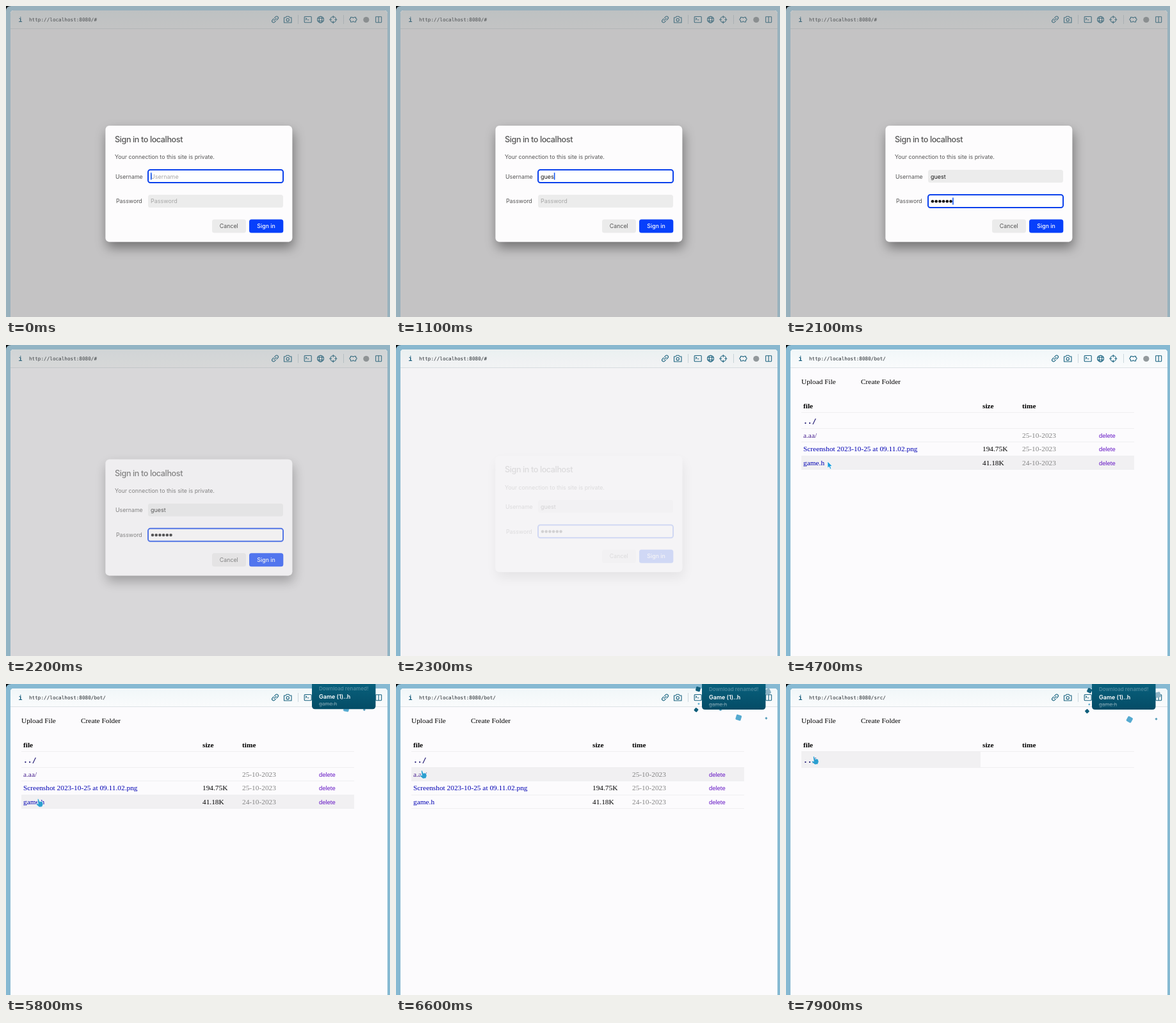
These frames come from a looping animation (600x486 px, 8000 ms). An HTML page:

```html
<!DOCTYPE html>
<html lang="en">
<head>
<meta charset="utf-8">
<title>File browser</title>
<style>
  html, body { margin: 0; width: 100%; height: 100%; overflow: hidden; background: #000; }
  svg { display: block; width: 600px; height: 486px; }
  text { white-space: pre; }
  .serif { font: 11.35px "Liberation Serif", serif; }
  .bold { font-weight: bold; }
  .mono { font: 7.66px "DejaVu Sans Mono", monospace; }
  .up { font: bold 11.35px "DejaVu Sans Mono", monospace; fill: #1c1470; }
  .del { font: 9.46px "Liberation Sans", sans-serif; fill: #6414c4; }
  .ui { font: 8.8px Inter, sans-serif; fill: #555; }
  .link { fill: #0000b4; }
  .seen { fill: #482090; }
  .gray { fill: #858585; }
  .icon { fill: none; stroke: #17627f; stroke-width: 1.1; stroke-linejoin: round; stroke-linecap: round; }
</style>
</head>
<body>
<svg id="stage" viewBox="0 0 600 486">
  <defs>
    <linearGradient id="barFill" x2="0" y2="1"><stop stop-color="#f1f7f9"/><stop offset="1" stop-color="#fafbfc"/></linearGradient>
    <linearGradient id="toastFill" x2="0" y2="1"><stop stop-color="#0b6a87"/><stop offset="1" stop-color="#044c66"/></linearGradient>
    <filter id="shadow" x="-20%" y="-20%" width="140%" height="150%"><feDropShadow dy="9" stdDeviation="9" flood-opacity=".42"/></filter>
  </defs>
  <rect width="600" height="486" fill="#05090b"/>
  <path id="frame" d="M0 486V8Q0 0 8 0H600V486Z"/>
  <path d="M7 486V12Q7 7 12 7H591Q596 7 596 12V486Z" fill="#fcfbfd"/>
  <path d="M7 36V12Q7 7 12 7H591Q596 7 596 12V36Z" fill="url(#barFill)"/>
  <path d="M7 35.5H596" stroke="#dce2e5"/>
  <text x="22.5" y="25" text-anchor="middle" style="font:bold 10px 'Liberation Mono',monospace" fill="#0d5878">i</text>
  <text id="url" class="mono" x="36" y="24" fill="#1c2226"></text>
  <path d="M456.5 14V28M527.5 14V28" stroke="#ccd8dd"/>
  <g class="icon">
    <g transform="translate(420.5 21) rotate(-45)">
      <path d="M-1 -2.4H-3.5a2.4 2.4 0 0 0 0 4.8H-1M1 -2.4H3.5a2.4 2.4 0 0 1 0 4.8H1M-2.4 0H2.4"/>
    </g>
    <path d="M434.5 18H437L438.3 16.3H442L443.3 18H446V26H434.5Z"/><circle cx="440.2" cy="21.7" r="2.2"/>
    <rect x="466.2" y="16.5" width="11" height="9.3" rx="1"/><path d="M468.3 18.8L470 20.2L468.3 21.6M471.2 21.8H473"/>
    <circle cx="491.5" cy="21.2" r="5"/><ellipse cx="491.5" cy="21.2" rx="2.2" ry="5"/><path d="M487 19.3H496M487 23.2H496"/>
    <circle cx="511.3" cy="21.2" r="4.4"/><path d="M511.3 15.5V18.7M511.3 23.7V26.9M505.6 21.2H508.8M513.8 21.2H517"/>
    <path d="M538.5 17.5H541a1.6 1.6 0 0 0 3 0H546.5V19.5a1.6 1.6 0 0 1 0 3.2V25H544a1.6 1.6 0 0 0 -3 0H538.5V22.7a1.6 1.6 0 0 1 0 -3.2Z"/>
    <rect x="577.7" y="16.7" width="9" height="9" rx=".6"/><path d="M582.2 17V25.5"/>
  </g>
  <circle cx="562.8" cy="21.5" r="4.6" fill="#92999c"/>
  <g id="page"></g>
  <path id="dim" d="M7 486V12Q7 7 12 7H591Q596 7 596 12V486Z" fill="#828282"/>
  <g id="dialog">
    <rect x="155.5" y="187" width="291.7" height="181.5" rx="6" fill="#fdfcfd" filter="url(#shadow)"/>
    <text x="170" y="213" class="ui" style="font-size:12.6px;font-weight:500;letter-spacing:-.4px">Sign in to localhost</text>
    <text x="170" y="239.3" class="ui">Your connection to this site is private.</text>
    <text x="171" y="269.5" class="ui">Username</text>
    <text x="172" y="308.3" class="ui">Password</text>
    <rect id="userBox" x="222" y="256" width="211" height="20" rx="3.5" stroke-width="2"/>
    <rect id="passBox" x="222" y="295" width="211" height="20" rx="3.5" stroke-width="2"/>
    <text id="user" x="226" y="269.5" class="ui" style="font-size:9px"></text>
    <text id="passHint" x="226" y="308.3" class="ui" style="font-size:9px;fill:#a6a6a6">Password</text>
    <g id="dots"></g>
    <rect id="caret" width="1.5" height="11" fill="#0a50f0"/>
    <rect x="322" y="333.5" width="53" height="21" rx="3.5" fill="#ebebeb"/>
    <text x="348.3" y="347.2" text-anchor="middle" class="ui">Cancel</text>
    <rect x="380" y="333.5" width="53.3" height="21" rx="3.5" fill="#0740fb"/>
    <text x="406.6" y="347.2" text-anchor="middle" class="ui" style="fill:#fff;font-weight:500">Sign in</text>
  </g>
  <g id="confetti"></g>
  <g id="toast">
    <path d="M478 -20H577.5V35Q577.5 40 572.5 40H483Q478 40 478 35Z" fill="url(#toastFill)"/>
    <g style="font-family:Inter,sans-serif" fill="#fff">
      <text x="489" y="11" font-size="8" font-weight="600" opacity=".27">Download renamed!</text>
      <text x="489" y="23.5" font-size="9" font-weight="600">Game (1)..h</text>
      <text x="489" y="34.5" font-size="8" opacity=".42" text-decoration="line-through">game.h</text>
    </g>
  </g>
  <g id="cursor" stroke="#fff" stroke-width=".7" stroke-linejoin="round">
    <path id="arrow" fill="#189ddb" d="M0 0V10.2L2.3 8.2L4 12L5.8 11.2L4.2 7.5L7.2 7.3Z"/>
    <path id="hand" fill="#2c9fd0" d="M-.8 .4Q.4 -.6 1.3 .6L2.8 4.4L5 3.8L7.3 4.8L8.2 8.5L6.6 12.5L2.2 13L-2.8 8.8Q-3 7.2 -1.5 7.2L.4 8Z"/>
  </g>
</svg>
<script>
const LOOP = 8000;
const $ = id => document.getElementById(id);
const clamp = v => Math.max(0, Math.min(1, v));
const progress = (t, from, to) => clamp((t - from) / (to - from));
const easeOut = p => 1 - (1 - p) ** 3;
const smooth = p => p * p * (3 - 2 * p);
const mix = (a, b, p) => a + (b - a) * p;

const ROW_TOP = 131, ROW_STEP = 21.25;
// Row: name, size, date, visited, deletable
const pages = {
  root: { path: '#', up: './', rows: [
    ['bot/', '', '27-10-2023', true, false],
    ['src/', '', '25-10-2023', true, true],
    ['include/', '', '25-10-2023', false, true],
    ['Game.h', '41.18K', '27-10-2023', false, true],
    ['Screenshot 2023-10-25 at 13.20.14.png', '188.24K', '25-10-2023', false, true]] },
  bot: { path: 'bot/', up: '../', rows: [
    ['a.aa/', '', '25-10-2023', true, true],
    ['Screenshot 2023-10-25 at 09.11.02.png', '194.75K', '25-10-2023', false, true],
    ['game.h', '41.18K', '24-10-2023', false, true]] },
  src: { path: 'src/', up: '../', rows: [] },
};
const visits = [[2500, 'root'], [3900, 'bot'], [6900, 'root'], [7500, 'src']];

// Cursor stops: time, x, y
const stops = [[2700, 330, 300], [3100, 239, 170], [3650, 40, 137], [4100, 40, 137],
  [4700, 65, 182], [5000, 50, 180], [5750, 50, 180], [6500, 40, 135], [6650, 40, 135],
  [6850, 39, 115], [7000, 39, 115], [7350, 38, 157], [7550, 38, 157], [7850, 43, 113]];

// Confetti: x, y, size, colour, drift x, drift y
const bits = [
  [472, 8, 7, '#12617f', 2.3, 2.3], [469, 40.5, 5.5, '#0f5e7b', 1.5, 2],
  [473, 31, 2.6, '#65b0d0', .8, .9], [507, 40, 3.5, '#4f9dbd', 0, -3],
  [535.3, 52.5, 8.5, '#55aad0', 1.5, 3], [578.5, 53.5, 3, '#5a9ebb', 0, 1.2],
  [581, 12, 8.5, '#8db3c5', 0, 5]];

const label = (x, y, cls, str) => `<text x="${x}" y="${y}" class="${cls}">${str}</text>`;
const line = y => `<path d="M24 ${y}H544" stroke="#efeff1"/>`;

function pageMarkup({ up, rows }) {
  const head = label(24, 61, 'serif', 'Upload File') + label(117, 61, 'serif', 'Create Folder') +
    [[27, 'file'], [307, 'size'], [369, 'time']].map(([x, s]) => label(x, 99, 'serif bold', s)).join('');
  const list = rows.map(([name, size, date, visited, deletable], i) => {
    const y = 145.2 + ROW_STEP * i;
    return label(27, y, 'serif ' + (visited ? 'seen' : 'link'), name) + label(307, y, 'serif', size) +
      label(369, y, 'serif gray', date) + (deletable ? label(489, y, 'del', 'delete') : '') +
      line(Math.round(ROW_TOP + ROW_STEP * (i + 1)) - .5);
  }).join('');
  return '<rect id="hover" x="24" fill="#f1f0f2"/>' + head + line(105.5) + line(130.5) +
    label(27, 123, 'up', up) + list;
}

$('dots').innerHTML = Array.from({ length: 6 }, (_, i) =>
  `<circle cx="${229 + 5.7 * i}" cy="305.2" r="2.3" fill="#111"/>`).join('');
$('confetti').innerHTML = bits.map(([, , s, color]) =>
  `<rect x="${-s / 2}" y="${-s / 2}" width="${s}" height="${s}" rx="${s / 5}" fill="${color}"/>`).join('');

const show = (id, on) => $(id).setAttribute('visibility', on ? 'visible' : 'hidden');
const set = (id, attrs) => { for (const k in attrs) $(id).setAttribute(k, attrs[k]); };

function drawDialog(t) {
  const gone = progress(t, 2130, 2330), opacity = 1 - gone;
  const onPass = t >= 1450;
  const typed = 'guest'.slice(0, Math.floor(5 * progress(t, 450, 1250)));
  const dots = Math.floor(6 * progress(t, 1500, 2050));
  const focus = { fill: '#fff', stroke: '#0a40ec' }, idle = { fill: '#ececec', stroke: 'none' };
  set('dim', { opacity: .46 * opacity });
  set('frame', { fill: `rgb(${mix(134, 152, opacity)},${mix(185, 177, opacity)},${mix(210, 189, opacity)})` });
  set('dialog', { opacity, transform: `translate(0 ${-14 * (1 - opacity ** 2)})` });
  set('userBox', onPass ? idle : focus);
  set('passBox', onPass ? focus : idle);
  $('user').textContent = typed || 'Username';
  $('user').style.fill = typed ? '#1a1a1a' : '#a6a6a6';
  show('passHint', !dots);
  [...$('dots').children].forEach((dot, i) => dot.setAttribute('visibility', i < dots ? 'visible' : 'hidden'));
  const textEnd = typed ? 226 + $('user').getComputedTextLength() : 226;
  set('caret', { x: onPass ? 226 + 5.7 * dots : textEnd, y: onPass ? 299.5 : 260.5 });
  show('caret', t < 2130);
}

function cursorAt(t) {
  const next = stops.findIndex(s => s[0] > t);
  if (next < 0) return stops[stops.length - 1].slice(1);
  const [t0, x0, y0] = stops[Math.max(0, next - 1)], [t1, x1, y1] = stops[next];
  const p = smooth(progress(t, t0, t1));
  return [mix(x0, x1, p), mix(y0, y1, p)];
}

let current;
function drawPage(t) {
  const visit = visits.filter(v => v[0] <= t).pop();
  const name = visit && visit[1], page = pages[name || 'root'];
  if (name !== current) {
    $('page').innerHTML = name ? pageMarkup(page) : '';
    current = name;
  }
  $('url').textContent = 'http://localhost:8080/' + page.path;
  const visible = t >= stops[0][0];
  show('cursor', visible);
  show('arrow', false);
  show('hand', false);
  if (!visible) return;

  const [x, y] = cursorAt(t), probe = y + 4;
  const row = Math.floor((probe - ROW_TOP) / ROW_STEP);
  const overUp = probe >= 106 && probe < ROW_TOP;
  const overRow = row >= 0 && row < page.rows.length;
  const linkText = overUp ? page.up : overRow ? page.rows[row][0] : '';
  const pointing = x < 27 + linkText.length * (overUp ? 6.83 : 4.9);
  set('cursor', { transform: `translate(${x} ${y})` });
  show('arrow', !pointing);
  show('hand', pointing);
  set('hover', overUp
    ? { y: 106, width: 280, height: 24 }
    : { y: ROW_TOP + ROW_STEP * row, width: overRow ? 520 : 0, height: 21 });
}

function drawToast(t) {
  const start = 5500, age = (t - 6600) / 1300;
  const spread = easeOut(progress(t, start + 100, start + 800));
  show('toast', t >= start);
  show('confetti', t >= start + 100);
  set('toast', { transform: `translate(0 ${-42 * (1 - easeOut(progress(t, start, start + 400)))})` });
  bits.forEach(([x, y, , , dx, dy], i) => {
    const px = mix(527, x + dx * age, spread), py = mix(18, y + dy * age, spread);
    $('confetti').children[i].setAttribute('transform', `translate(${px} ${py}) rotate(${15 + i * 23 + age * 12})`);
  });
}

function draw(t) {
  drawDialog(t);
  drawPage(t);
  drawToast(t);
}

const started = performance.now();
function tick() {
  draw((performance.now() - started) % LOOP);
  requestAnimationFrame(tick);
}
tick();
</script>
</body>
</html>
```
